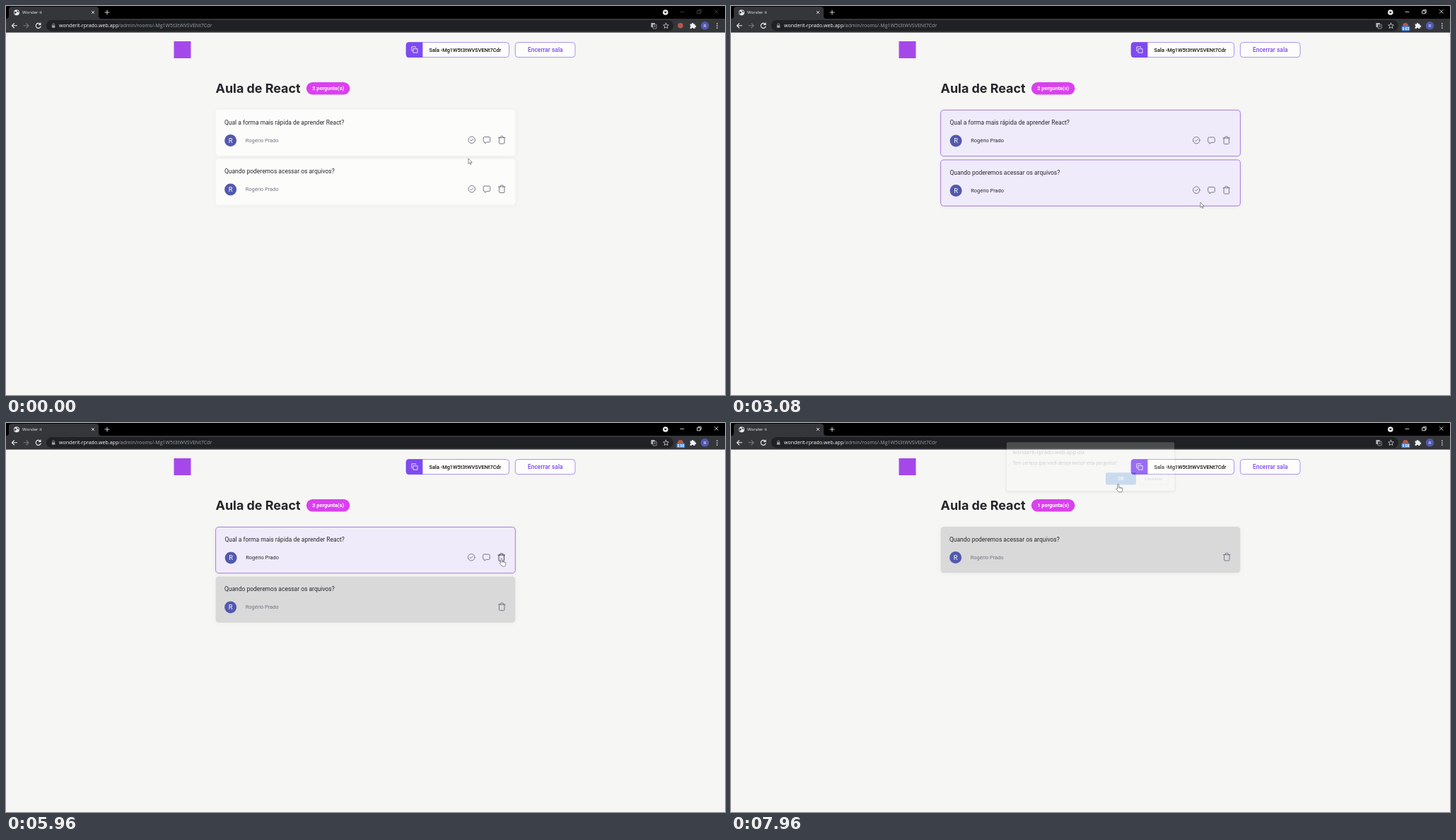
These frames come from a looping animation (1017x551 px, 8000 ms). An HTML page:

```html
<!DOCTYPE html>
<html lang="pt-BR">
<head>
<meta charset="utf-8">
<title>Wonder it</title>
<style>
html, body { margin: 0; width: 100%; height: 100%; overflow: hidden; background: #f6f6f4; }
svg { display: block; width: 100%; height: 100%; }
text { font-family: Roboto, sans-serif; white-space: pre; }
.ui { font-family: "Open Sans", "Noto Sans", sans-serif; }
.card { filter: drop-shadow(0 1px 3px rgba(0, 0, 0, .04)); }
.line { fill: none; stroke-linecap: round; stroke-linejoin: round; }
</style>
</head>
<body>
<svg id="stage" viewBox="0 0 1017 551"></svg>
<script>
const LOOP = 8000;
const PURPLE = '#7f4af0', INK = '#29292e', GREY = '#737380', AVATAR = '#5259ae';
const stage = document.getElementById('stage');

function add(parent, tag, attrs = {}, content) {
  const el = document.createElementNS('http://www.w3.org/2000/svg', tag);
  set(el, attrs);
  if (content !== undefined) el.textContent = content;
  parent.appendChild(el);
  return el;
}
function set(el, attrs) {
  for (const key in attrs) el.setAttribute(key, attrs[key]);
}
function show(el, on) {
  el.setAttribute('display', on ? 'inline' : 'none');
}
const group = (parent, attrs) => add(parent, 'g', attrs);
const rect = (parent, x, y, width, height, fill, rx = 0, more = {}) =>
  add(parent, 'rect', { x, y, width, height, fill, rx, ...more });
const disc = (parent, cx, cy, r, fill, more = {}) =>
  add(parent, 'circle', { cx, cy, r, fill, ...more });
const line = (parent, d, stroke, width = 1, more = {}) =>
  add(parent, 'path', { d, stroke, 'stroke-width': width, class: 'line', ...more });
// y is the middle of the capital letters
const label = (parent, x, y, str, size, fill, more = {}) =>
  add(parent, 'text', { x, y: y + size * .355, 'font-size': size, fill, ...more }, str);
const centred = { 'text-anchor': 'middle' };

function avatar(parent, x, y, r, size) {
  disc(parent, x, y, r, AVATAR);
  label(parent, x, y, 'R', size, '#fff', centred);
}

// Browser frame
function buildBrowser() {
  const g = group(stage);
  rect(g, 0, 0, 1017, 18, '#000');
  rect(g, 0, 18, 1017, 19.6, '#35363a');
  add(g, 'path', { d: 'M0 18Q4 18 4 14V5Q4 1 8 1H127Q131 1 131 5V14Q131 18 135 18Z', fill: '#35363a' });
  rect(g, 57, 20, 887, 15.6, '#202124', 7.8);

  disc(g, 15, 9.2, 4, '#e8eaed');
  add(g, 'path', { d: 'M12 7.5L15 8.4 14.6 10 13 10.4 13.4 12 11.6 10.6ZM15.4 5.8L18 7.6 17.6 9.6 15.8 8Z', fill: '#45464a' });
  label(g, 23, 9, 'Wonder it', 6.1, '#eceef0', { class: 'ui' });
  line(g, 'M121.2 7.2l3.6 3.6m0-3.6l-3.6 3.6M143 6v6M140 9h6', '#e4e6e9', .9);

  line(g, 'M15.5 27.8H8.5M11.6 24.6L8.4 27.8 11.6 31', '#f1f3f4', 1.1);
  line(g, 'M25 27.8h7M28.9 24.6l3.2 3.2-3.2 3.2', '#75777b', 1.1);
  line(g, 'M48.5 25.7A3.5 3.5 0 1 0 49.1 29M49 24v2.4h-2.4', '#f1f3f4', 1.1);
  rect(g, 64.9, 27.2, 4.4, 3.6, '#9aa0a6', .4);
  line(g, 'M65.8 27v-1a1.3 1.3 0 0 1 2.6 0v1', '#9aa0a6', .7);
  const url = label(g, 75, 27.6, '', 7.05, '#9aa0a6', { class: 'ui' });
  add(url, 'tspan', { fill: '#fff' }, 'wonderit-rprado.web.app');
  add(url, 'tspan', {}, '/admin/rooms/-Mg1W5t3tWVSVENt7Cdr');

  rect(g, 912.4, 24, 5.4, 6, '#b4b7bb', .6);
  rect(g, 915, 26, 5.2, 6, '#202124', .6, { stroke: '#b4b7bb', 'stroke-width': .7 });
  label(g, 917.6, 29, 'A', 4, '#b4b7bb', centred);
  line(g, 'M933.5 24.2l1.1 2.5 2.7.3-2 1.8.6 2.7-2.4-1.4-2.4 1.4.6-2.7-2-1.8 2.7-.3Z', '#d5d7da', .8);

  disc(g, 954, 27.8, 3.8, '#b5584e');
  add(g, 'path', { d: 'M967.6 25.4h2.2a1.3 1.3 0 1 1 2.6 0h2v2.2a1.3 1.3 0 1 1 0 2.4v2h-2.2a1.2 1.2 0 0 0-2.4 0h-2.2v-2.2a1.2 1.2 0 0 0 0-2.3Z', fill: '#f1f3f4' });
  avatar(g, 988.5, 27.8, 5.8, 6);
  for (const y of [25, 28, 31]) disc(g, 1005.8, y, .85, '#f1f3f4');

  const badge = group(g);
  rect(badge, 948.6, 28.4, 11.6, 6.8, '#4286d6', 1.2);
  const count = label(badge, 954.4, 31.8, '', 4.9, '#fff', { ...centred, 'font-weight': 700 });

  disc(g, 932.8, 9, 3.8, '#e8eaed');
  add(g, 'path', { d: 'M930.9 8h3.8l-1.9 2.4Z', fill: '#000' });
  const controls = line(g, 'M953.8 8.3h5M978 6.8h4v4h-4ZM979.2 6.6v-1.2h4v4h-1.1M1002.4 5.4l4.8 4.8m0-4.8l-4.8 4.8', '#fff', .8);
  return { badge, count, controls };
}

// Page header and title
function buildHeader() {
  const g = group(stage);
  rect(g, 237.5, 50, 24, 24, '#a548ea');

  const frame = { stroke: '#a286f0', 'stroke-width': .9 };
  rect(g, 566.2, 51.6, 145.4, 21, '#fdfdfc', 4, frame);
  add(g, 'path', { d: 'M589.4 51.2H570Q565.8 51.2 565.8 55.4V68.8Q565.8 73 570 73H589.4Z', fill: PURPLE });
  line(g, 'M576.4 60.6h5.6v5.6h-5.6ZM574.6 63.6h-.8v-5.8h5.8v.8', '#fff', .8);
  label(g, 598.5, 62.2, 'Sala -Mg1W5t3tWVSVENt7Cdr', 7.42, '#111', { 'font-weight': 500 });

  rect(g, 720.4, 51.6, 84.6, 21, '#fdfdfc', 4, frame);
  label(g, 762.8, 62.2, 'Encerrar sala', 8.47, PURPLE, { ...centred, 'font-weight': 500 });

  label(g, 296.6, 117, 'Aula de React', 17.9, '#24242a', { style: 'font-family:Inter,sans-serif;font-weight:700' });
  rect(g, 424.8, 108, 61.6, 17.6, '#db40ef', 8.8);
  return label(g, 455.6, 116.8, '', 7.42, '#fff', { ...centred, 'font-weight': 700 });
}

const ICONS = [
  'M21 12A9 9 0 1 1 3 12 9 9 0 0 1 21 12ZM8.4 12.3l2.2 2.2 5-5',
  'M12 18h6a3 3 0 0 0 3-3V7a3 3 0 0 0-3-3H6a3 3 0 0 0-3 3v8a3 3 0 0 0 3 3h1.5v3Z',
  'M3 6h18M8 6V4a2 2 0 0 1 2-2h4a2 2 0 0 1 2 2v2M19 6v14a2 2 0 0 1-2 2H7a2 2 0 0 1-2-2V6'
];
const ICON_X = [658.8, 680, 701.3];
const PLAIN = 0, LIT = 1, DONE = 2;

function buildCard(question) {
  const root = group(stage);
  const box = rect(root, 296.6, 0, 423.8, 65.3, '#fcfcfb', 4.2, { class: 'card' });
  const left = group(root), right = group(root);
  label(left, 309, 17.7, question, 8.47, INK);
  avatar(left, 317.6, 43.6, 8.5, 9.4);
  const name = label(left, 338.8, 43.2, 'Rogério Prado', 7.42, GREY);
  const icons = ICONS.map((d, i) => line(right, d, GREY, 1.8, {
    transform: `translate(${ICON_X[i] - 6.36} ${42.8 - 6.36}) scale(.53)`
  }));
  return { root, box, left, right, name, icons };
}

function drawCard(card, top, state, hovered) {
  const inset = state === LIT ? .5 : 0;
  const height = 65.3 + 2 * inset;
  set(card.root, { transform: `translate(0 ${top})` });
  // the border lies inside the card's height
  set(card.box, {
    y: inset,
    height: height - 2 * inset,
    fill: ['#fcfcfb', '#f0ebfb', '#d9d9d9'][state],
    stroke: state === LIT ? '#9b6de4' : 'none',
    'stroke-width': .9
  });
  set(card.left, { transform: `translate(${inset} ${inset})` });
  set(card.right, { transform: `translate(${-inset} ${inset})` });
  set(card.name, { fill: state === LIT ? INK : GREY });
  card.icons.forEach((icon, i) => {
    show(icon, state !== DONE || i === 2);
    set(icon, { stroke: i === hovered ? '#38383f' : GREY });
  });
  return height;
}

function buildDialog() {
  const g = group(stage);
  rect(g, 389.8, 36, 237.4, 69, '#fff', 2, { style: 'filter:drop-shadow(0 1px 2px rgba(0,0,0,.5))' });
  label(g, 398.4, 50, 'wonderit-rprado.web.app diz', 7.5, '#202124', { class: 'ui' });
  label(g, 398.4, 65.5, 'Tem certeza que você deseja excluir esta pergunta?', 6.2, '#202124', { class: 'ui' });
  rect(g, 530, 79, 43, 17.4, '#1b70df', 2);
  label(g, 551.4, 87.4, 'OK', 6.1, '#fff', { ...centred, class: 'ui', 'font-weight': 700 });
  rect(g, 577.4, 79.4, 41, 16.6, '#fff', 2, { stroke: '#dadce0', 'stroke-width': .8 });
  label(g, 597.8, 87.4, 'Cancelar', 6.1, '#2f72d4', { ...centred, class: 'ui', 'font-weight': 600 });
  return g;
}

function buildCursor() {
  const root = group(stage, { stroke: '#45454c', 'stroke-width': .6, fill: '#fff', 'stroke-linejoin': 'round' });
  const arrow = add(root, 'path', { d: 'M0 0V7.4L1.7 5.9 2.9 8.5 4.1 8 2.9 5.4H5.2Z' });
  const hand = group(root);
  add(hand, 'path', { d: 'M-1 1A1 1 0 0 1 1 1V4.2Q2.4 3.7 2.8 4.6 4.1 4.2 4.5 5.2 6 5 6 6.3V8Q6 9.6 5 11.2H.7Q-.8 8.8-2.8 7-2.4 5.5-1 6.5Z' });
  add(hand, 'path', { d: 'M1 4.2V6M2.8 4.6V6.2M4.5 5.2V6.5', 'stroke-width': .5 });
  return { root, arrow, hand };
}

const browser = buildBrowser();
const counter = buildHeader();
const cards = ['Qual a forma mais rápida de aprender React?', 'Quando poderemos acessar os arquivos?'].map(buildCard);
const dialog = buildDialog();
const cursor = buildCursor();

// Timeline: time, x, y of the pointer tip
const PATH = [
  [0, 654, 216], [600, 681, 190], [1000, 680.5, 190], [1350, 681, 258], [1700, 680, 259],
  [1960, 669.5, 265], [2350, 660, 280], [3100, 664, 278], [3700, 657, 259.6], [4800, 657, 259.6],
  [5600, 701, 192], [6350, 700.8, 191.5], [6840, 620.2, 176], [7400, 547.6, 86.6], [LOOP, 547.6, 86.6]
];
const HAND = [[500, 1080], [1280, 1880], [3600, 5000], [5480, LOOP]];
// start, end, card, icon
const HOVER = [[500, 1080, 0, 1], [1280, 2000, 1, 1], [3600, 4700, 1, 0], [5480, 7880, 0, 2]];
const FOCUS = 400, LIGHT_FIRST = 840, LIGHT_SECOND = 1640, ANSWER = 4700, REMOVE = 7880;
const OPEN = 6360, CLOSE = 7840;

const clamp = v => Math.min(1, Math.max(0, v));
const ease = v => v * v * (3 - 2 * v);
const within = (t, [from, to]) => t >= from && t < to;

function pointer(t) {
  const i = PATH.findIndex(p => p[0] > t);
  const [t0, x0, y0] = PATH[i - 1], [t1, x1, y1] = PATH[i];
  const k = ease((t - t0) / (t1 - t0));
  return [x0 + (x1 - x0) * k, y0 + (y1 - y0) * k];
}

function draw(t) {
  const seconds = Math.floor((t + 100) / 1000);
  set(browser.controls, { stroke: t < FOCUS ? '#4c4c4c' : '#fff' });
  show(browser.badge, seconds > 0);
  browser.count.textContent = '0:0' + seconds;

  const removed = t >= REMOVE;
  const hover = HOVER.find(h => within(t, h));
  const hoverOn = card => hover && hover[2] === card ? hover[3] : -1;
  counter.textContent = (removed ? 1 : 2) + ' pergunta(s)';
  show(cards[0].root, !removed);
  let top = 146.9;
  if (!removed) top += drawCard(cards[0], top, t < LIGHT_FIRST ? PLAIN : LIT, hoverOn(0)) + 4.24;
  drawCard(cards[1], top, t < LIGHT_SECOND ? PLAIN : t < ANSWER ? LIT : DONE, hoverOn(1));

  const shown = clamp((t - OPEN) / 180) * (1 - clamp((t - CLOSE) / 150));
  show(dialog, shown > 0);
  set(dialog, { opacity: shown, transform: `translate(0 ${-11 * (1 - shown)})` });

  const isHand = HAND.some(span => within(t, span));
  set(cursor.root, { transform: `translate(${pointer(t)})` });
  show(cursor.hand, isHand);
  show(cursor.arrow, !isHand);
}

const start = performance.now();
function tick() {
  draw((performance.now() - start) % LOOP);
  requestAnimationFrame(tick);
}
tick();
</script>
</body>
</html>
```
